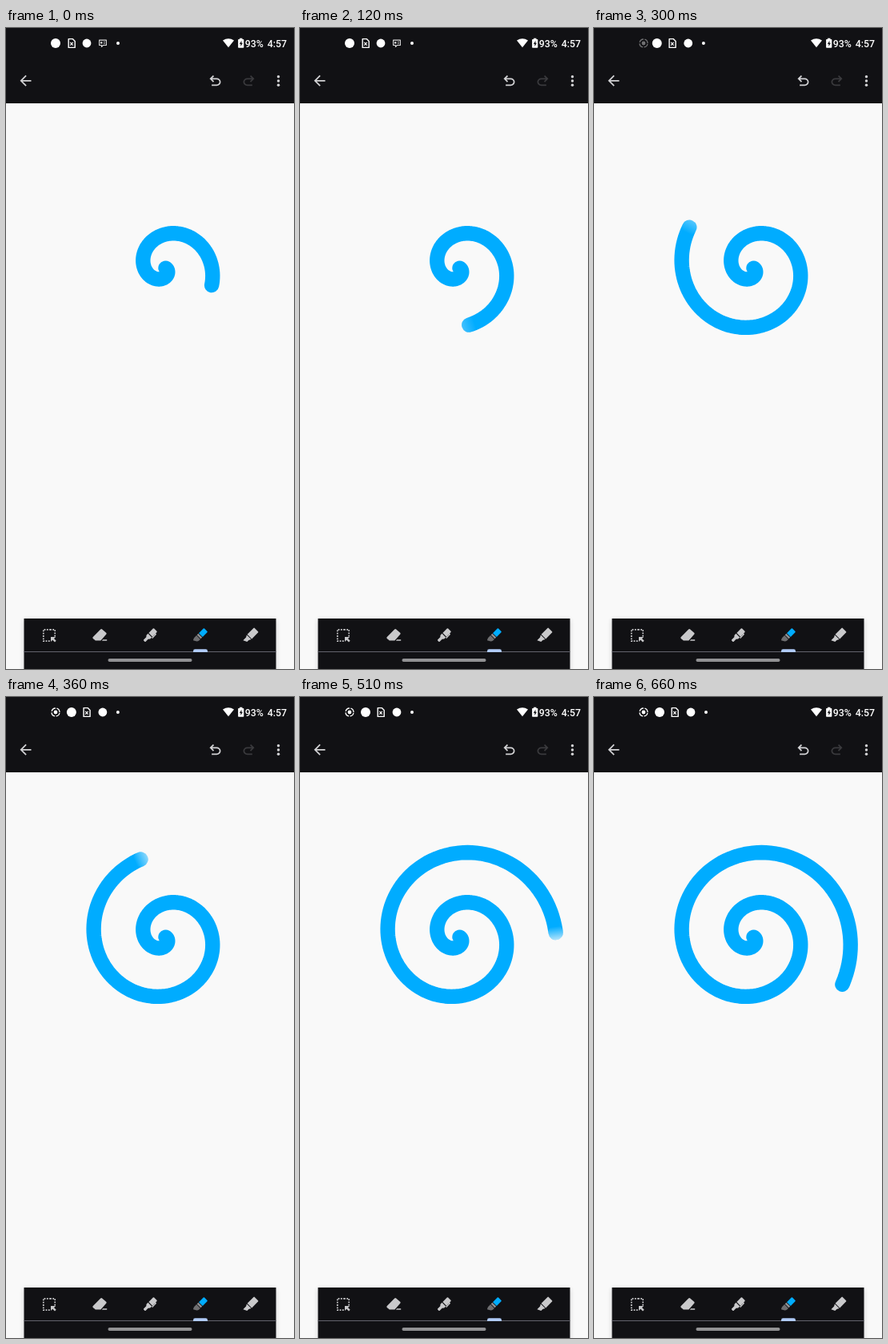
These frames come from a looping animation (360 by 800 pixels, 900 ms). An HTML page:

```html
<!DOCTYPE html>
<html lang="en">
<head>
<meta charset="utf-8">
<title>Spiral drawing</title>
<style>
  html, body { margin: 0; width: 100%; height: 100%; overflow: hidden; background: #f9f9f9; }
  svg { display: block; width: 100%; height: 100%; }
  text { font: 500 12.3px Roboto, sans-serif; fill: #fff; }
</style>
</head>
<body>
<svg viewBox="0 0 360 800">
  <defs>
    <filter id="soft" x="-10%" y="-30%" width="120%" height="160%"><feGaussianBlur stdDeviation="3"/></filter>
    <linearGradient id="wet">
      <stop offset=".1" stop-color="#f9f9f9" stop-opacity="0"/>
      <stop offset="1" stop-color="#f9f9f9"/>
    </linearGradient>
    <path id="turn" transform="scale(.02188) translate(-480 480)" d="M280-200v-80h284q63 0 109.5-40T720-420q0-60-46.5-100T564-560H312l104 104-56 56-200-200 200-200 56 56-104 104h252q97 0 166.5 63T800-420q0 94-69.5 157T564-200H280Z"/>
  </defs>
  <rect width="360" height="800" fill="#f9f9f9"/>

  <path id="stroke" fill="none" stroke="#00acff" stroke-width="18.4" stroke-linecap="round" stroke-linejoin="round"/>
  <circle id="tip" r="9.4" fill="url(#wet)"/>

  <rect width="360" height="94" fill="#111114"/>
  <g fill="#fff">
    <g id="record">
      <circle r="5" fill="none" stroke="#fff" stroke-width="1.3" stroke-dasharray="6.3 1.55" stroke-dashoffset="-.8"/>
      <circle r="2.4"/>
    </g>
    <circle id="badge1" r="6"/>
    <g id="file">
      <path d="M-3.8-5.4h5l3 3v7.8h-8z" fill="none" stroke="#fff" stroke-width="1.4" stroke-linejoin="round"/>
      <path d="M-1.7-1.2l3.4 3.8m0-3.8l-3.4 3.8" stroke="#fff" stroke-width="1.2"/>
    </g>
    <circle id="badge2" r="5.4"/>
    <g id="card">
      <path d="M-4.4-3.9h8.8v6.4h-4l-2 2v-2h-2.8z" fill="none" stroke="#ddd" stroke-width="1.1" stroke-linejoin="round"/>
      <path d="M-3-1.8h2.4v2.4h-2.4zM.8-1.8h2.2v.9h-2.2zM.8-.1h2.2v.9h-2.2z" fill="#ddd"/>
    </g>
    <circle id="newDot" r="2"/>
    <circle id="oldDot" r="2" cx="140" cy="19"/>
    <path d="M278 24.3L271 15.6Q278 10.8 285 15.6Z"/>
    <path d="M292 14v-1.2h3.4V14h1.1q.8 0 .8.8v9.2q0 .8-.8.8h-5.6q-.8 0-.8-.8v-9.2q0-.8.8-.8z"/>
    <path d="M294.4 15.8l-2.5 4.1h1.5v3.1l2.5-4.2h-1.5z" fill="#111114"/>
    <text x="298.8" y="23.8">93%</text>
    <text x="326.8" y="23.8">4:57</text>
  </g>

  <g fill="#d2d2d4">
    <path transform="translate(14 55.3) scale(.875)" d="M20 11H7.83l5.59-5.59L12 4l-8 8 8 8 1.41-1.41L7.83 13H20v-2z"/>
    <use href="#turn" x="261.5" y="66"/>
    <use href="#turn" transform="translate(303.5 66) scale(-1 1)" fill="#3a3a3d"/>
    <circle cx="340.5" cy="60.8" r="1.75"/>
    <circle cx="340.5" cy="66" r="1.75"/>
    <circle cx="340.5" cy="71.2" r="1.75"/>
  </g>

  <rect x="22.5" y="739" width="315" height="70" opacity=".16" filter="url(#soft)"/>
  <rect x="22.5" y="737" width="315" height="63" fill="#111114"/>
  <g fill="#c9c9cb">
    <g transform="translate(54 758)">
      <path d="M2-7.2h-9.2V7.2H2M1-7.2h6.2V2" fill="none" stroke="#c9c9cb" stroke-width="1.7" stroke-dasharray="1.8 1.5"/>
      <path d="M2 2h6.2L6 4.1l2.7 2.7-1.7 1.7-2.8-2.7L2 8z"/>
    </g>
    <g transform="translate(117 758)">
      <path d="M1.2-7.4q1-.9 2-.1l4.9 4.3q1 .9.1 1.9L1.4 6.6H-5.2l-3-2.7q-.9-.9 0-1.9z"/>
      <path d="M4.2 5.2h5v1.5H2.8z"/>
    </g>
    <g transform="translate(180 758) rotate(45)">
      <path d="M-3.3-8.6q0-1 1-1h4.6q1 0 1 1v2h1.6V.6H3.5V-5H3.3V-1h-6.6z"/>
      <path d="M-3.3.2h6.6V3L1.7 5v4.2q0 1-1 1h-1.4q-1 0-1-1V5L-3.3 3z"/>
    </g>
    <g transform="translate(243 758) rotate(45)">
      <path d="M-3.4-8.6q0-1 1-1h4.8q1 0 1 1v8h-6.8z" fill="#00acff"/>
      <path d="M-3.4.3h6.8v2.4h-6.8z" fill="#929294"/>
      <path d="M-3.4 3.5h6.8v2.7Q2.6 9-2 10.8-3.4 8.6-3.4 6.6z" fill="#6e6e70"/>
    </g>
    <g transform="translate(306 758) rotate(45)">
      <path d="M-4-8.8q0-1 1-1h6q1 0 1 1V2.2h-8z"/>
      <path d="M-4 3.2h8L2.4 6v3L-2.4 11.2V6z"/>
    </g>
  </g>
  <rect x="22.5" y="778" width="315" height="1" fill="#62626c"/>
  <path d="M234 779v-1.3q0-2.4 2.4-2.4h13.2q2.4 0 2.4 2.4v1.3z" fill="#b0cbf8"/>
  <rect x="127.5" y="787" width="105" height="4" rx="2" fill="#929294"/>
</svg>
<script>
const LOOP = 900, STEP = 30, END = 4 * Math.PI;
// [ms, swept angle] along the spiral
const sweep = [[0, 6.15], [120, 7.2], [210, 8.34], [300, 9.5], [420, 10.89], [510, 12.03], [560, END]];
const wetness = [[0, 0], [60, .25], [300, .35], [420, .8], [540, .7], [600, 0]];

const $ = id => document.getElementById(id);
const clamp = v => Math.min(1, Math.max(0, v));
const mix = (a, b, p) => a + (b - a) * p;

function along(keys, t) {
  const i = keys.findIndex(k => k[0] > t);
  if (i < 0) return keys[keys.length - 1][1];
  const [t0, a] = keys[i - 1], [t1, b] = keys[i];
  return mix(a, b, (t - t0) / (t1 - t0));
}

// cubic-bezier(.4, 0, .2, 1)
function ease(x) {
  let lo = 0, hi = 1;
  for (let i = 0; i < 20; i++) {
    const s = (lo + hi) / 2, r = 1 - s;
    if (1.2 * r * r * s + .6 * r * s * s + s ** 3 < x) lo = s; else hi = s;
  }
  return lo * lo * (3 - 2 * lo);
}

function spiral(a) {
  const r = 10 * a;
  return [199.5 + r * Math.cos(a + .49), 299.6 + r * Math.sin(a + .49)];
}

function place(id, x, alpha = 1, size = 1) {
  $(id).setAttribute("transform", `translate(${x} 19) scale(${size})`);
  $(id).setAttribute("opacity", alpha);
}

function draw(t) {
  const end = along(sweep, t), pts = [];
  for (let a = 0; a < end; a += .05) pts.push(spiral(a));
  const [x, y] = spiral(end);
  pts.push([x, y]);
  $("stroke").setAttribute("d", "M" + pts.map(p => p.map(v => v.toFixed(2)).join(" ")).join("L"));
  const heading = (end + .49 + Math.atan(end)) * 180 / Math.PI;
  $("tip").setAttribute("transform", `translate(${x} ${y}) rotate(${heading})`);
  $("tip").setAttribute("opacity", along(wetness, t));

  const p = ease(clamp((t - 200) / 180));
  const shrink = clamp(p / .7);
  place("record", 62, clamp((t - 260) / 100));
  place("badge1", mix(62, 82, p));
  place("file", mix(82, 101, p));
  place("badge2", mix(101, 121, p));
  place("card", mix(121, 140, p), 1 - shrink, 1 - .6 * shrink);
  place("newDot", mix(121, 140, p), shrink);
  $("oldDot").setAttribute("opacity", 1 - shrink);
}

function tick(now) {
  draw(Math.floor(now % LOOP / STEP) * STEP);
  requestAnimationFrame(tick);
}
draw(0);
requestAnimationFrame(tick);
</script>
</body>
</html>
```
